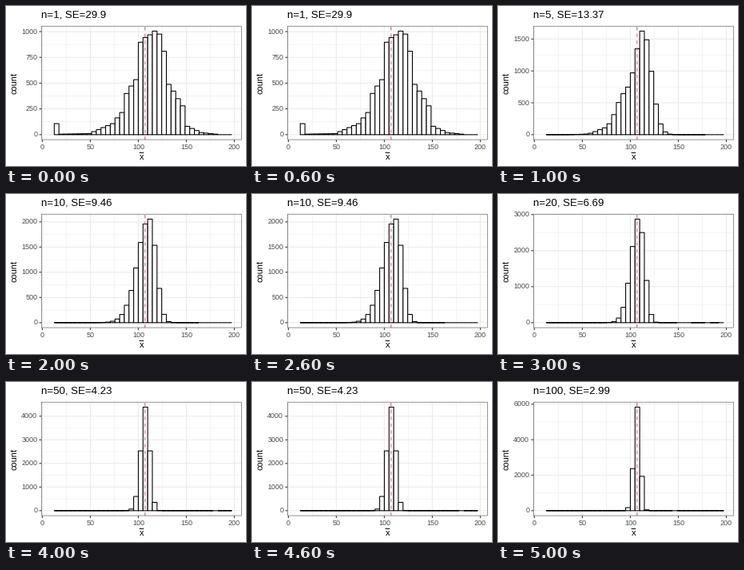
Recreate the animation shown at these times as a matplotlib script. Size 300x200 px, loop 6 s.

```python
import matplotlib.pyplot as plt
import numpy as np
from matplotlib.animation import FuncAnimation
from matplotlib.patches import Rectangle

plt.rcParams["font.family"] = "Liberation Sans"
PT = 0.72                       # points per pixel at 100 dpi
THICK, THIN = 1.07, 0.53        # line widths in pixels
LEFT, RIGHT, TOP, BOTTOM = 44.3, 294.5, 24.9, 167.3
HEIGHT = BOTTOM - TOP
BASE = BOTTOM - HEIGHT / 22     # zero line, 5% above the panel's lower edge
ZERO_X, PX_PER_UNIT = 45.4, 1.2
BINS, START, WIDTH = 38, 12.42, 4.867
MEAN, SD = 107, 29.9

# sample size, tick step, tallest bar
STAGES = [(1, 250, 1005), (5, 500, 1625), (10, 500, 2055),
          (20, 1000, 2875), (50, 1000, 4385), (100, 2000, 5835)]


def population(step):
    """Skewed values with a share of zeros that brings the mean to MEAN."""
    x = np.arange(0, 200, step)
    knots = [0, 1, 7, 12, 14, 15, 17, 18, 21, 22, 23, 24, 27, 28, 31, 35]
    shape = [107, 5, 10, 107, 215, 400, 534, 897, 1005, 966, 810, 488, 280,
             80, 20, 0]
    p = np.interp((x - START) // WIDTH, knots, shape, left=0, right=0)
    p /= p.sum()
    kept = MEAN / (p @ x)
    p *= kept
    p[0] = 1 - kept
    return p


def mean_counts(n, peak, step=0.05):
    """Histogram of means of n draws, by n-fold convolution."""
    p = population(step)
    size = len(p) * n
    dist = np.fft.irfft(np.fft.rfft(p, size) ** n, size)
    edges = START + WIDTH * np.arange(BINS + 1)
    counts, _ = np.histogram(np.arange(size) * step / n, edges, weights=dist)
    return counts * peak / counts.max()


HISTOGRAMS = [mean_counts(n, peak) for n, _, peak in STAGES]

fig = plt.figure(figsize=(3, 2), dpi=100, facecolor="white")
ax = fig.add_axes([0, 0, 1, 1])


def line(xs, ys, color, width=THICK, **kw):
    ax.plot(xs, ys, color=color, lw=width * PT, snap=False,
            solid_capstyle="butt", dash_capstyle="butt", **kw)


def label(x, y, text, size, color="black", **kw):
    ax.text(x, y, text, fontsize=size * PT, color=color, **kw)


def box(x, y, w, h, edge, fill, width=THICK):
    ax.add_patch(Rectangle((x, y), w, h, ec=edge, fc=fill, lw=width * PT,
                           joinstyle="miter", snap=False))


def to_x(value):
    return ZERO_X + value * PX_PER_UNIT


def draw(i):
    n, step, peak = STAGES[i]
    ax.clear()
    ax.set(xlim=(0, 300), ylim=(200, 0))
    ax.axis("off")

    scale = HEIGHT / 1.1 / peak
    limit = 1.05 * peak
    ticks_x = range(0, 201, 50)
    ticks_y = np.arange(0, limit, step, dtype=int)
    minor_y = np.arange(step / 2, limit, step)

    for xs, ys, width in ((range(25, 200, 50), minor_y, THIN),
                          (ticks_x, ticks_y, THICK)):
        for v in ys:
            line([LEFT, RIGHT], [BASE - v * scale] * 2, "#EBEBEB", width,
                 zorder=0)
        for v in xs:
            line([to_x(v)] * 2, [BOTTOM, TOP], "#EBEBEB", width, zorder=0)

    for k, count in enumerate(HISTOGRAMS[i]):
        box(to_x(START + k * WIDTH), BASE, WIDTH * PX_PER_UNIT,
            -count * scale, "black", "white")
    line([to_x(MEAN)] * 2, [BOTTOM, TOP], "#DF536B", ls=(0, (4, 4)))
    inset = THIN / 2
    box(LEFT + inset, TOP + inset, RIGHT - LEFT - THIN, HEIGHT - THIN,
        "#333333", "none", THIN)

    for v in ticks_x:
        line([to_x(v)] * 2, [BOTTOM, BOTTOM + 2.75], "#333333")
        label(to_x(v), 179, str(v), 9, "#4D4D4D", ha="center")
    for v in ticks_y:
        y = BASE - v * scale
        line([LEFT - 2.75, LEFT], [y, y], "#333333")
        label(LEFT - 5, y + 2.6, str(v), 9, "#4D4D4D", ha="right")

    label(LEFT - 0.3, 15, f"n={n}, SE={round(SD / n ** 0.5, 2)}", 13.2)
    label(15.3, (TOP + BOTTOM) / 2, "count", 11, rotation=90,
          ha="right", va="center")
    mid = (LEFT + RIGHT) / 2
    label(mid, 192, "x", 11, ha="center")
    line([mid - 2.8, mid + 2.8], [183.5, 183.5], "black", 1)
    return []


anim = FuncAnimation(fig, draw, frames=len(STAGES), init_func=lambda: draw(0),
                     interval=1000, repeat=True, repeat_delay=0)
plt.show()
```
